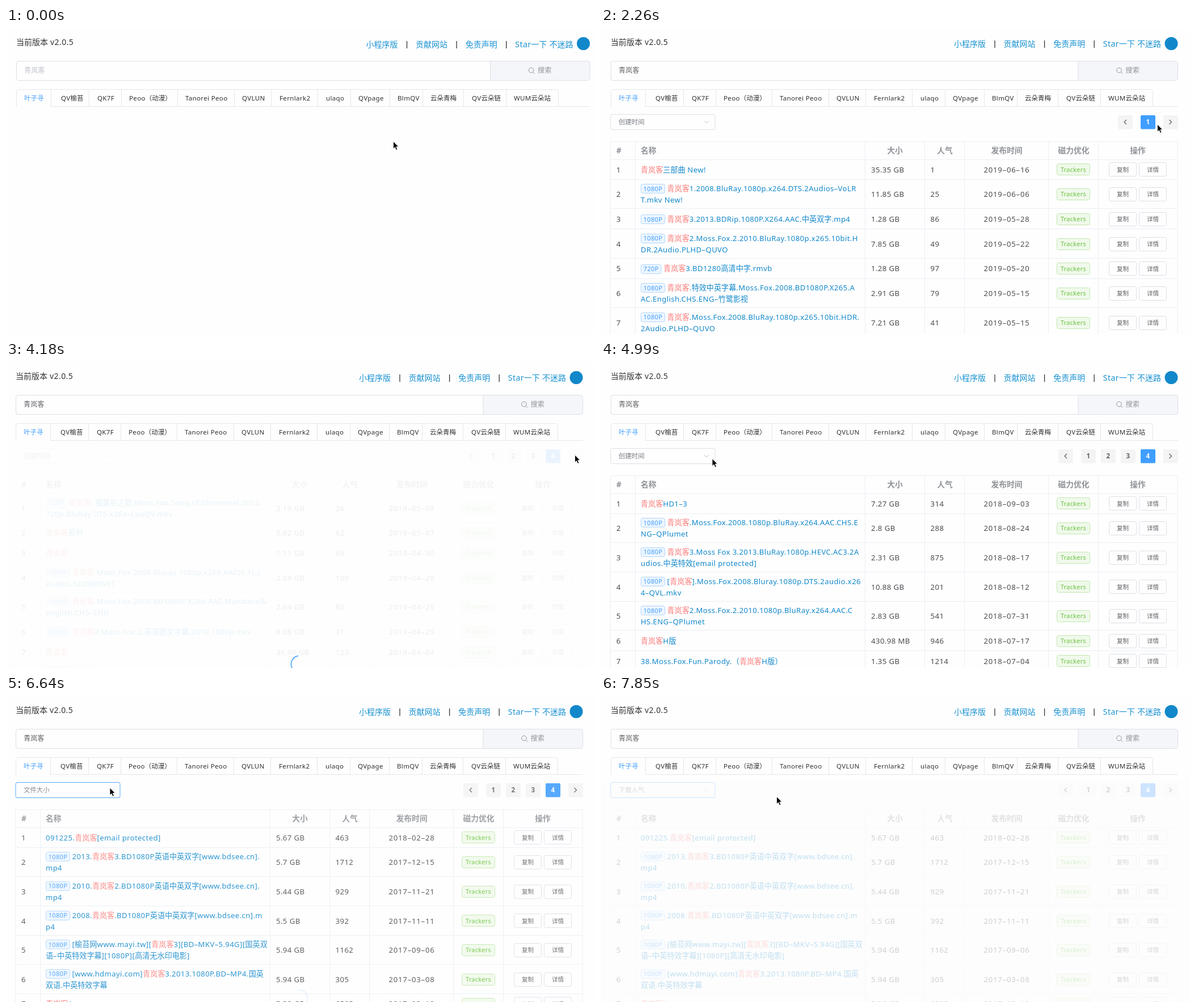
Animation of 1038x540 px, one loop 8000 ms. Source, as an HTML page:

```html
<!DOCTYPE html>
<html lang="zh-CN">
<head>
<meta charset="utf-8">
<title>搜索</title>
<style>
html, body { margin: 0; width: 100%; height: 100%; overflow: hidden; background: #fefefe; }
svg { display: block; width: 1038px; height: 540px; }
text { font-family: 'Noto Sans', 'Noto Sans CJK SC', 'Noto Sans CJK', sans-serif; letter-spacing: .03em; white-space: pre; }
.cjk { letter-spacing: 0; }
.key { fill: #fa7f7d; }
.date { letter-spacing: .057em; }
.bold { font-weight: 600; }
</style>
</head>
<body>
<svg viewBox="0 0 1038 540"><g id="page"></g><g id="over"></g></svg>
<script>
const LOOP = 8000, KEY = '青岚客';
const BLUE = '#409eff', LINK = '#1288cb', NAV = '#1a92d2', TEXT = '#606266', GREY = '#909399', EDGE = '#dcdfe6', LINE = '#ebeef5';

const tabs = ['叶子寻', 'QV榆苔', 'QK7F', 'Peoo（动漫）', 'Tanorei Peoo', 'QVLUN', 'Fernlark2', 'ulaqo', 'QVpage', 'BlmQV', '云朵青梅', 'QV云朵链', 'WUM云朵站'];
const tabText = [32, 97, 161, 217, 316, 416, 482, 564, 621, 690, 748, 821, 895];
const tabEdge = [80, 147, 204, 303, 403, 468, 550, 608, 677, 735, 807, 882];
const sorts = ['创建时间', '文件大小', '下载人气'];

// name (badge first, | breaks the line); size; popularity; date
const parse = s => s.trim().split('\n').map(r => r.split(';'));
const pages = [null, parse(`
${KEY}三部曲 New!;35.35 GB;1;2019-06-16
1080P ${KEY}1.2008.BluRay.1080p.x264.DTS.2Audios-VoLR|T.mkv New!;11.85 GB;25;2019-06-06
1080P ${KEY}3.2013.BDRip.1080P.X264.AAC.中英双字.mp4;1.28 GB;86;2019-05-28
1080P ${KEY}2.Moss.Fox.2.2010.BluRay.1080p.x265.10bit.H|DR.2Audio.PLHD-QUVO;7.85 GB;49;2019-05-22
720P ${KEY}3.BD1280高清中字.rmvb;1.28 GB;97;2019-05-20
1080P ${KEY}.特效中英字幕.Moss.Fox.2008.BD1080P.X265.A|AC.English.CHS.ENG-竹鹭影视;2.91 GB;79;2019-05-15
1080P ${KEY}.Moss.Fox.2008.BluRay.1080p.x265.10bit.HDR.|2Audio.PLHD-QUVO;7.21 GB;41;2019-05-15`), parse(`
720P ${KEY}: 萤露谷之歌.Moss.Fox.Song.of.Glimmerel.2013.|720p.BluRay.DTS.x264-LuoQV.mkv;2.19 GB;26;2019-05-08
${KEY}系列;5.82 GB;62;2019-05-07
${KEY};1.11 GB;69;2019-04-30
1080P ${KEY}.Moss.Fox.2008.Bluray.1080p.x265.AAC(5.1).2|Audios.SLOWRIVET;2.89 GB;190;2019-04-29
1080P ${KEY}.Moss.Fox.2008.BD1080P.X264.AAC.Mandarin&|english.CHS-ENG;2.64 GB;80;2019-04-29
1080P ${KEY}2.Moss.Fox.2.英语德文字幕.2010.1080p.mkv;8.08 GB;31;2019-04-29
${KEY};36.98 GB;123;2019-04-04
1080P ${KEY}.Moss.Fox.2008.1080p.BluRay.x264.AAC|.mkv;2.75 GB;88;2019-04-02`), parse(`
${KEY}HD1-3;7.27 GB;314;2018-09-03
1080P ${KEY}.Moss.Fox.2008.1080p.BluRay.x264.AAC.CHS.E|NG-QPlumet;2.8 GB;288;2018-08-24
1080P ${KEY}3.Moss Fox 3.2013.BluRay.1080p.HEVC.AC3.2A|udios.中英特效[email protected];2.31 GB;875;2018-08-17
1080P [${KEY}].Moss.Fox.2008.Bluray.1080p.DTS.2audio.x26|4-QVL.mkv;10.88 GB;201;2018-08-12
1080P ${KEY}2.Moss.Fox.2.2010.1080p.BluRay.x264.AAC.C|HS.ENG-QPlumet;2.83 GB;541;2018-07-31
${KEY}H版;430.98 MB;946;2018-07-17
38.Moss.Fox.Fun.Parody.（${KEY}H版）;1.35 GB;1214;2018-07-04`), parse(`
091225.${KEY}[email protected];5.67 GB;463;2018-02-28
1080P 2013.${KEY}3.BD1080P英语中英双字[www.bdsee.cn].|mp4;5.7 GB;1712;2017-12-15
1080P 2010.${KEY}2.BD1080P英语中英双字[www.bdsee.cn].|mp4;5.44 GB;929;2017-11-21
1080P 2008.${KEY}.BD1080P英语中英双字[www.bdsee.cn].m|p4;5.5 GB;392;2017-11-11
1080P [榆苔网www.mayi.tw][${KEY}3][BD-MKV-5.94G][国英双|语-中英特效字幕][1080P][高清无水印电影];5.94 GB;1162;2017-09-06
1080P [www.hdmayi.com]${KEY}3.2013.1080P.BD-MP4.国英|双语.中英特效字幕;5.94 GB;305;2017-03-08
${KEY}1;5.38 GB;6505;2017-03-12`)];

// each request: when it starts and ends, rows it brings, pager number, sort order
const loads = [
  { start: 870, end: 1750, rows: 1, pager: 1, sort: 0 },
  { start: 2740, end: 2950, rows: 1, pager: 2, sort: 0 },
  { start: 3060, end: 3240, rows: 2, pager: 3, sort: 0 },
  { start: 3800, end: 4200, rows: 3, pager: 4, sort: 0 },
  { start: 5840, end: 6380, rows: 4, pager: 4, sort: 1 },
  { start: 7630, end: 9000, rows: 4, pager: 4, sort: 2 }
];
const menus = [[5300, 5840], [6850, 7630]];
const mouse = [
  [90, 682.5, 200], [560, 881, 70], [780, 881, 70], [1130, 574.5, 239], [1650, 574.5, 239], [2260, 980.5, 170],
  [2440, 1002, 167], [2740, 1002, 167], [2900, 1002.5, 164], [4250, 1002.5, 164], [4990, 196, 170.5],
  [5250, 184, 166], [5400, 184, 166], [5740, 110, 239], [5900, 110, 239], [6400, 183, 162],
  [6850, 183, 162], [7170, 150, 268], [7580, 150, 268], [7850, 309.5, 177.5]
];

const clamp = v => Math.max(0, Math.min(1, v));
const smooth = v => v * v * (3 - 2 * v);

const markup = s => s.replace(/&/g, '&amp;').replace(/-/g, '–')
  .replace(/[\u3000-\uffef]+/g, '<tspan class="cjk">$&</tspan>')
  .replaceAll(KEY, `<tspan class="key">${KEY}</tspan>`);
const text = (x, y, s, size, fill, anchor = 'start', cls = '') =>
  `<text x="${x}" y="${y + size * .36}" font-size="${size}" fill="${fill}" text-anchor="${anchor}" class="${cls}">${markup(s)}</text>`;
const rect = (x, y, w, h, r, fill, stroke = 'none') =>
  `<rect x="${x}" y="${y}" width="${w}" height="${h}" rx="${r}" fill="${fill}" stroke="${stroke}"/>`;
const path = (d, stroke, more = '') => `<path d="${d}" fill="none" stroke="${stroke}" ${more}/>`;
const box = (x, y, w, h, s, fill, edge, ink, size) =>
  rect(x, Math.floor(y - h / 2) + .5, w, h, 3, fill, edge) + text(x + w / 2, y, s, size, ink, 'middle');

function header(wide, filled) {
  const dx = wide ? 0 : -1, far = wide ? 0 : -12.5;
  const left = 18.5 + dx, split = 853.5 + far, right = 1029 + far, linkY = wide ? 29 : 28;
  let s = text(18 + dx, 25, '当前版本 v2.0.5', 14, '#333');
  ['小程序版', '贡献网站', '免责声明', 'Star一下 不迷路'].forEach((name, i) => {
    const x = 634.5 + i * 87.6 + far;
    s += text(x, linkY, name, 14, NAV);
    if (i < 3) s += path(`M${x + 72} ${linkY - 6}v13`, '#333', 'stroke-width="1.3"');
  });
  s += `<circle cx="${1017.5 + far}" cy="27.5" r="11.5" fill="${LINK}"/>`;

  s += rect(left, 58.5, right - left, 34, 4, '#f5f6fa', EDGE);
  s += `<path d="M${split} 58.5H${left + 4}q-4 0-4 4v26q0 4 4 4H${split}z" fill="#fefefe" stroke="${EDGE}"/>`;
  s += text(32 + dx, 75, KEY, 12.2, filled ? TEXT : '#c0c4cc').replace('class="key"', '');
  s += `<circle cx="${925.5 + far}" cy="74.5" r="4.3" fill="none" stroke="${GREY}"/>`;
  s += path(`M${928.7 + far} 77.7l3 3`, GREY) + text(937 + far, 75, '搜索', 12.2, GREY);

  const tabEnd = 973.5 + dx;
  s += path(`M${left} 138.5V112.5q0-4 4-4H${tabEnd - 4}q4 0 4 4V138.5`, '#e4e7ed');
  s += path(tabEdge.map(x => `M${x - .5 + dx} 108v30`).join('') + `M${79 + dx} 138.5H${right}`, '#e4e7ed');
  tabs.forEach((name, i) => s += text(tabText[i] + dx, 123.5, name, 11.5, i ? '#303133' : BLUE));
  return s;
}

function toolbar(load, focused, open) {
  let s = rect(17, 152.5, 184, 27, 3, '#fefefe', focused ? BLUE : EDGE);
  s += text(31, 166, sorts[load.sort], 11.4, '#777a80');
  s += path(open ? 'M182 168l4-4 4 4' : 'M182 164l4 4 4-4', '#c0c4cc');
  const first = 964 - (load.pager - 1) * 35;
  const button = (x, fill) => rect(x - 13, 154, 26, 24.5, 2, fill);
  s += button(first - 40, '#f4f4f5') + path(`M${first - 38} 162l-4 4 4 4`, TEXT, 'stroke-width="1.3"');
  s += button(1004, '#f4f4f5') + path('M1001.5 162l4 4-4 4', TEXT, 'stroke-width="1.3"');
  for (let i = 1; i <= load.pager; i++) {
    const x = first + (i - 1) * 35, on = i === load.pager;
    s += button(x, on ? BLUE : '#f4f4f5') + text(x, 166, String(i), 11.5, on ? '#fff' : TEXT, 'middle', 'bold');
  }
  return s;
}

function nameCell(name, y) {
  const [, badge, rest] = name.match(/^(?:(\d+P) )?(.*)$/);
  const lines = rest.split('|'), top = y - (lines.length - 1) * 10;
  const w = badge ? badge.length * 6.5 + 9.5 : 0;
  return (badge ? box(70.5, top + .3, w, 16, badge, '#ecf5ff', '#b3d8ff', BLUE, 11) : '') +
    lines.map((line, i) => text(badge && !i ? 74.5 + w : 70, top + i * 20, line, 13.1, LINK)).join('');
}

function table(rows) {
  let s = path('M16.5 200.5H1016.5M16.5 232.5H1016.5' +
    [16.5, 60.5, 465.5, 570.5, 640.5, 788.5, 876.5, 1016].map(x => `M${x} 200V540`).join(''), LINE);
  const head = (x, name, anchor) => text(x, 216, name, 13.8, GREY, anchor, 'bold');
  s += head(27, '#') + head(70, '名称');
  [[518, '大小'], [606, '人气'], [715, '发布时间'], [833, '磁力优化'], [946, '操作']]
    .forEach(([x, name]) => s += head(x, name, 'middle'));
  let y = 232;
  rows.forEach(([name, size, heat, date], i) => {
    const h = name.includes('|') ? 51.6 : 35.8, c = y + h / 2;
    s += text(27, c, String(i + 1), 13.2, '#4a4c50') + nameCell(name, c);
    s += text(476, c, size, 13.2, '#4a4c50') + text(580.5, c, heat, 13.2, '#4a4c50');
    s += text(715, c, date, 13.2, '#4a4c50', 'middle', 'date');
    s += box(803.5, c, 58, 20, 'Trackers', '#f0f9eb', '#c2e7b0', '#67c23a', 10.8);
    s += box(895.5, c, 48, 24, '复制', '#fefefe', EDGE, TEXT, 10.6) + box(948.5, c, 48, 24, '详情', '#fefefe', EDGE, TEXT, 10.6);
    y += h;
    s += path(`M17 ${Math.round(y) - .5}H1016`, LINE);
  });
  return s;
}

function spinner(age, x, y, alpha) {
  const p = age % 1500 / 750;
  const grow = smooth(clamp(p)), slide = smooth(clamp(p - 1));
  return `<circle r="14.5" pathLength="126" fill="none" stroke="${BLUE}" stroke-width="1.6" stroke-linecap="round" opacity="${alpha}"
    stroke-dasharray="${1 + 89 * grow} 200" stroke-dashoffset="${-40 * grow - 80 * slide}"
    transform="translate(${x} ${y}) rotate(${age * .18})"/>`;
}

function menu(sort) {
  return rect(17, 190.5, 184, 97, 4, '#fff', '#e4e7ed') + sorts.map((name, i) =>
    text(34, 210 + i * 29, name, 11.8, i === sort ? BLUE : TEXT, 'start', i === sort ? 'bold' : '')).join('');
}

function pointer(t) {
  let i = mouse.findIndex(k => k[0] > t);
  if (i < 0) i = mouse.length;
  const a = mouse[Math.max(0, i - 1)], b = mouse[Math.min(i, mouse.length - 1)];
  const u = b === a ? 0 : smooth((t - a[0]) / (b[0] - a[0]));
  const x = a[1] + (b[1] - a[1]) * u, y = a[2] + (b[2] - a[2]) * u;
  return `<path d="M0 0V13.2l3-2.8 2 4.9 2.4-1-2.1-4.8H9.3z" fill="#000" stroke="#fff" stroke-width=".9" transform="translate(${x} ${y})"/>`;
}

const fade = (load, t) => clamp((t - load.start) / 270) * clamp(1 - (t - load.end) / 300);

const last = {};
function show(id, html) {
  if (last[id] !== html) document.getElementById(id).innerHTML = last[id] = html;
}

function draw(t) {
  const load = loads.findLast(l => l.start <= t), done = loads.findLast(l => l.end <= t);
  const open = menus.some(([from, to]) => t >= from && t < to);
  show('page', header(!done, t >= 190) + (done ? toolbar(load, t >= 5300, open) + table(pages[done.rows]) : ''));

  const mask = Math.max(...loads.map(l => fade(l, t)));
  let over = '';
  if (mask > 0) {
    over += `<rect y="150" width="1038" height="390" fill="#fefefe" opacity="${.9 * mask}"/>`;
    over += spinner(t - load.start, done ? 517 : 523, done ? 533 : 371, fade(load, t));
  }
  if (open) over += menu(load.sort);
  show('over', over + pointer(t));
}

function tick() {
  draw(performance.now() % LOOP);
  requestAnimationFrame(tick);
}
tick();
</script>
</body>
</html>
```
